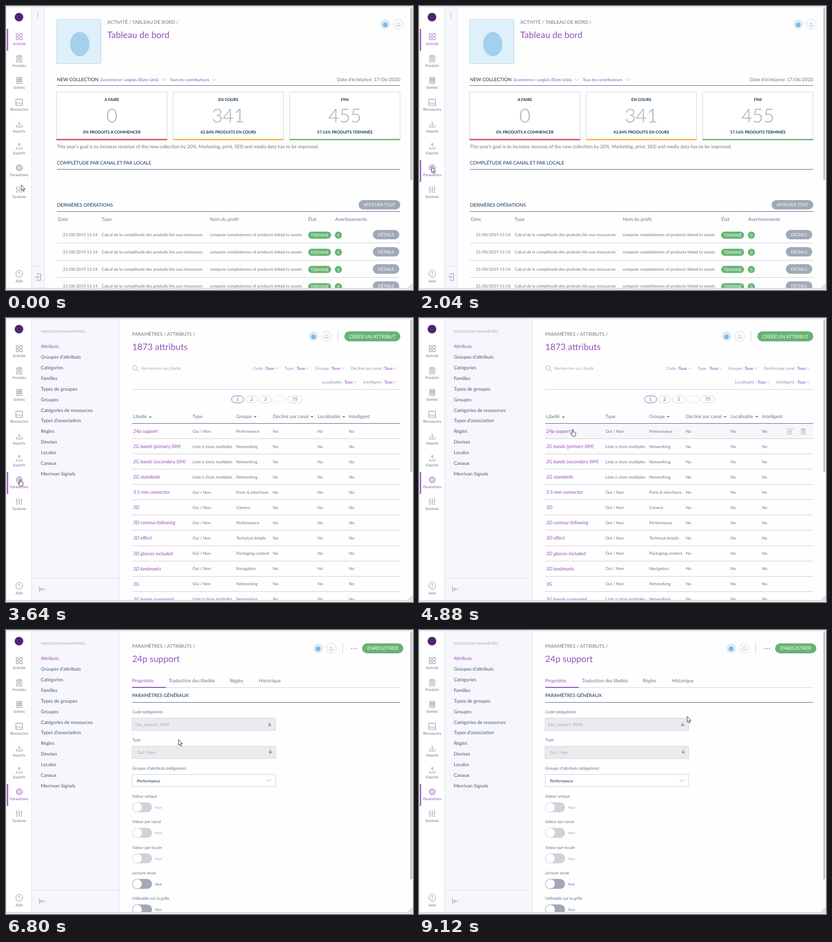
Recreate the animation shown at these times as an HTML page. Size 800 by 559 pixels, loop 9160 ms.

```html
<!DOCTYPE html>
<html lang="fr">
<head>
<meta charset="utf-8">
<title>Tableau de bord</title>
<style>
html, body { margin: 0; width: 100%; height: 100%; overflow: hidden; background: #fff; }
svg { display: block; position: absolute; left: 0; top: 0; }
text { font-family: Lato, "Open Sans", sans-serif; text-rendering: geometricPrecision; white-space: pre; }
.item { color: #67768a; }
.item .bar { visibility: hidden; }
.item.on { color: #9452ba; }
.item.on .bar { visibility: visible; }
.row .hover { visibility: hidden; }
.row.on .hover { visibility: visible; }
</style>
</head>
<body>
<svg id="stage" width="800" height="559" viewBox="0 0 800 559"></svg>
<script>
const PURPLE = '#9452ba', GREY = '#67768a', DARK = '#11324d', PALE = '#a1a9b7',
      RULE = '#ccd1d8', EDGE = '#dfe1e8', STRONG = '#566c80', GREEN = '#67b373',
      BASE = 9.35, SMALL = 8.12, MENU = 7.3;

// Markup helpers
const text = (x, y, s, size = BASE, fill = GREY, extra = '') =>
  `<text x="${x}" y="${y}" font-size="${size}" fill="${fill}" ${extra}>${s}</text>`;
const mid = (x, y, s, size, fill, extra = '') => text(x, y, s, size, fill, 'text-anchor="middle" ' + extra);
const rect = (x, y, w, h, fill, extra = '') =>
  `<rect x="${x}" y="${y}" width="${w}" height="${h}" fill="${fill}" ${extra}/>`;
const disc = (x, y, r, fill, extra = '') => `<circle cx="${x}" cy="${y}" r="${r}" fill="${fill}" ${extra}/>`;
const line = (d, stroke = GREY, w = 1, extra = '') =>
  `<path d="${d}" fill="none" stroke="${stroke}" stroke-width="${w}" ${extra}/>`;
const hr = (y, x1, x2, color = RULE, h = 1) => rect(x1, y, x2 - x1, h, color);
const pill = (x, y, w, h, fill, s, size) =>
  rect(x, y, w, h, fill, `rx="${h / 2}"`) + mid(x + w / 2, y + h / 2 + size * .36, s, size, '#fff');
const group = (s, extra = '') => `<g ${extra}>${s}</g>`;
const at = (x, y, s) => group(s, `transform="translate(${x} ${y})"`);
const chevron = (x, y, r) => line(`M${x - r} ${y - r / 2}l${r} ${r}l${r} ${-r}`, PALE, .9);

const avatar = x => disc(x, 36, 9.7, '#d9edf9') + disc(x, 37, 4.6, '#7fb5de');
const bell = x => disc(x, 36, 9.7, '#fff', `stroke="${RULE}"`) +
  line(`M${x - 4} 39h8q-1.4-1.2-1.4-4a2.6 2.6 0 0 0-5.2 0q0 2.8-1.4 4M${x - 1} 40.6h2`, PALE, .8);

const glyph = d => line(d, 'currentColor', .8);
const ring = (r, w, extra = '') => disc(0, 0, r, 'none', `stroke="currentColor" stroke-width="${w}" ${extra}`);
const icons = [
  glyph('M-6 -6h4.8v4.8h-4.8zM1.2 -6h4.8v4.8h-4.8zM-6 1.2h4.8v4.8h-4.8zM1.2 1.2h4.8v4.8h-4.8z'),
  glyph('M-2 -5h-3v11.5h10v-11.5h-3M-2 -6.5h4v3h-4zM-3 -1h6M-3 1.3h6M-3 3.6h6'),
  glyph('M-5 -6h10v12h-10zM-3 -3.5h2.2v2.2h-2.2zM.8 -3.5h2.2v2.2h-2.2zM-3 .5h2.2v2.2h-2.2zM.8 .5h2.2v2.2h-2.2z'),
  glyph('M-6.5 -6h13v12h-13zM-6.5 4l3.5 -4l3 3l3 -2.5l3.5 3.5M1.5 -3h1.6'),
  glyph('M0 -5v7M-2.5 -.3l2.5 2.5l2.5 -2.5M-5.5 2v3.5h11v-3.5'),
  glyph('M0 2v-7M-2.5 -2.5l2.5 -2.5l2.5 2.5M-5.5 2v3.5h11v-3.5'),
  ring(2.2, .8) + ring(4.9, .8) + ring(5.8, 1.3, 'stroke-dasharray="2.3 2.255"'),
  glyph('M-4.5 -6.5v5M-4.5 1v5.5M0 -6.5v8M0 4v2.5M4.5 -6.5v2.5M4.5 -1.5v8M-6.5 -.5h4M-2 2.5h4M2.5 -2.5h4')
];
const labels = ['Activité', 'Produits', 'Entités', 'Ressources', 'Imports', 'Exports', 'Paramètres', 'Système'];

const menu = rect(1, 2, 49, 553, '#fff') + rect(50, 2, 1, 553, EDGE) +
  disc(25.5, 22, 8.5, '#50246f') +
  labels.map((s, i) => group(
    rect(1.8, 45 + 43 * i, 2.4, 43, PURPLE, 'class="bar"') +
    at(26, 60.5 + 43 * i, icons[i]) +
    mid(26, 76.7 + 43 * i, s, MENU, 'currentColor'), 'class="item"')).join('') +
  disc(26, 527, 6.6, 'none', `stroke="${GREY}" stroke-width=".8"`) +
  mid(26, 530, '?', 8.5, GREY) + mid(26, 543.7, 'Aide', MENU, GREY);

const scrollbar = h => rect(794.7, 3, 3.8, h, '#c3c3c6', 'rx="1.9"');

// Dashboard
function dashboard() {
  let s = rect(51, 2, 24, 553, '#f7f6fc') + rect(75, 2, 1, 553, EDGE) + hr(512, 51, 75, EDGE);
  for (const y of [13, 17.7, 22.4]) s += disc(62.5, y, 1.1, PALE);
  s += line('M61 529v-2h7v13h-7v-2M56.5 533.5h8M62 531l2.6 2.5l-2.6 2.5', GREY, .8);
  s += rect(99.5, 26.5, 87, 87, '#def0fa', 'rx="2" stroke="#bcd5e5"');
  s += '<ellipse cx="145" cy="75" rx="19" ry="24" fill="#a5d0ec"/>';
  s += text(199, 35, 'ACTIVITÉ / TABLEAU DE BORD /') + text(199, 63, 'Tableau de bord', 17.5, PURPLE);
  s += avatar(745.5) + bell(771);
  s += text(100, 148, 'NEW COLLECTION', BASE, DARK) +
    text(186, 148, 'Ecommerce | anglais (États-Unis)', 8.05, PURPLE) + chevron(310, 145, 4.3) +
    text(322, 148, 'Tous les contributeurs', 8.05, PURPLE) + chevron(409.5, 145, 4.3) +
    text(775, 148, 'Date d’échéance: 17/06/2020', BASE, GREY, 'text-anchor="end"');
  s += hr(156, 100, 775, STRONG);
  const cards = [
    ['A FAIRE', '0', '0% PRODUITS A COMMENCER', '#d4475b'],
    ['EN COURS', '341', '42.84% PRODUITS EN COURS', '#f9b53f'],
    ['FINI', '455', '57.16% PRODUITS TERMINÉS', GREEN]
  ];
  cards.forEach(([head, n, foot, color], i) => {
    const x = 99.5 + 229 * i, c = x + 108.5;
    s += rect(x, 169.5, 217, 94, '#fff', `stroke="${RULE}" stroke-width=".9"`) +
      rect(x - .4, 261.6, 217.8, 2.6, color) +
      mid(c, 186.7, head, 7.9, DARK, 'font-weight="700"') +
      mid(c, 229.3, n, 37.5, PALE, 'font-weight="300"') +
      mid(c, 251, foot, 7.9, DARK, 'font-weight="700"');
  });
  s += text(100, 280, 'This year’s goal is to increase revenue of the new collection by 20%. Marketing, print, SEO and media data has to be improved.', BASE);
  s += text(100, 312, 'COMPLÉTUDE PAR CANAL ET PAR LOCALE', BASE, DARK) + hr(321, 100, 775, STRONG);
  s += text(100, 395, 'DERNIÈRES OPÉRATIONS', BASE, DARK) + pill(693, 382, 82, 18.5, PALE, 'AFFICHER TOUT', 8.1);
  s += hr(404, 100, 775, STRONG);
  [[102, 'Date'], [188, 'Type'], [400.5, 'Nom du profil'], [594, 'État'], [647, 'Avertissements']]
    .forEach(([x, h]) => s += text(x, 423, h));
  for (let i = 0; i < 4; i++) {
    const y = 450 + 33.8 * i;
    s += text(112, y + 3, '21/08/2019 11:14', SMALL) +
      text(188, y + 3, 'Calcul de la complétude des produits liés aux ressources', SMALL) +
      text(400.5, y + 3, 'compute completeness of products linked to assets', SMALL) +
      pill(594, y - 6, 45, 14, GREEN, 'TERMINÉ', 8.15) + pill(646.3, y - 6, 14, 14, GREEN, '0', 8.15) +
      pill(721, y - 9.3, 52, 18.6, PALE, 'DÉTAILS', 8.1) + hr(Math.round(y + 16), 100, 775);
  }
  return s + scrollbar(340);
}

// Settings navigation, shared by the list and the form
const navItems = ['Attributs', 'Groupes d’attributs', 'Catégories', 'Familles', 'Types de groupes', 'Groupes',
  'Catégories de ressources', 'Types d’association', 'Règles', 'Devises', 'Locales', 'Canaux', 'Merrivan Signals'];
const nav = rect(51, 2, 171, 553, '#f7f6fc') + rect(222, 2, 1, 553, EDGE) + hr(512, 51, 222, EDGE) +
  text(68.5, 29.3, 'NAVIGATION PARAMÈTRES', 6.85, PALE) +
  navItems.map((s, i) => text(68.5, 59.3 + 20.87 * i, s, BASE, i ? '#3f5a70' : PURPLE)).join('') +
  line('M66 528v12M77.5 534h-9.5M71.5 530.5l-3.5 3.5l3.5 3.5', GREY, .8);

const crumb = text(248, 35, 'PARAMÈTRES / ATTRIBUTS /');

// Attribute list
const many = 'Liste à choix multiples', bool = 'Oui / Non';
const rows = [
  ['24p support', bool, 'Performance'], ['2G bands (primary SIM)', many, 'Networking'],
  ['2G bands (secondary SIM)', many, 'Networking'], ['2G standards', many, 'Networking'],
  ['3.5 mm connector', bool, 'Ports &amp; interfaces'], ['3D', bool, 'Camera'],
  ['3D contour following', bool, 'Performance'], ['3D effect', bool, 'Technical details'],
  ['3D glasses included', bool, 'Packaging content'], ['3D landmarks', bool, 'Navigation'],
  ['3G', bool, 'Networking'], ['3G bands supported', many, 'Networking']
];
const rowTop = 208, rowStep = 30.08;

function list() {
  let s = nav + crumb + text(248, 63, '1873 attributs', 17.4, PURPLE) + avatar(604.5) + bell(630) +
    rect(652, 26, 1, 20, RULE) + pill(665, 26.3, 110, 19.7, GREEN, 'CRÉER UN ATTRIBUT', 9.35);
  s += disc(253.5, 98, 4.4, 'none', `stroke="${PALE}"`) + line('M256.7 101.2l4.6 4.2', PALE) +
    text(266, 102, 'Rechercher sur Libellé', 8.05, PALE);
  [[486, 102, 'Code', 510, 532], [547.5, 102, 'Type', 571.3, 592], [608, 102, 'Groupe', 640, 661.5],
   [678, 102, 'Décliné par canal', 743.5, 764.8], [621, 129, 'Localisable', 665, 686.5],
   [702.5, 129, 'Intelligent', 743.5, 764.8]].forEach(([x, y, label, vx, cx]) =>
    s += text(x, y, label + ' :', 8.05, '#8a96a6') +
      text(vx, y, 'Tous', 8.05, PURPLE, 'font-weight="600"') + chevron(cx, y - 3, 3));
  s += hr(140, 248, 775);
  [[443.5, 23.5, '1', PURPLE, GREY], [471, 23.5, '2', RULE, GREY], [498.5, 23.5, '3', RULE, GREY],
   [525.7, 24, '...', '#e3e6ea', RULE], [553.7, 28.3, '75', RULE, GREY]].forEach(([x, w, label, edge, ink]) =>
    s += rect(x, 153.3, w, 13.6, '#fff', `rx="6.8" stroke="${edge}"`) + mid(x + w / 2, 163.4, label, 9.3, ink));
  [[250, 'Libellé'], [366.5, 'Type'], [452.5, 'Groupe'], [524.5, 'Décliné par canal'], [612.5, 'Localisable'],
   [674, 'Intelligent']].forEach(([x, h]) => s += text(x, 197.3, h));
  s += `<path d="M281 196l2.7-3.2l2.7 3.2z" fill="${GREY}"/>`;
  for (const x of [490, 601.5, 664]) s += `<path d="M${x - 2.7} 193l2.7 3.2l2.7-3.2z" fill="${GREY}"/>`;
  rows.forEach(([label, type, family], i) => {
    const y = rowTop + rowStep * i, b = y + 17.5;
    const tools = line(`M732 ${y + 14}v6.5h-8v-10h5M727 ${y + 17}l.6-2.4l5.5-5.5l1.7 1.7l-5.5 5.5z`, PALE, .9) +
      line(`M752 ${y + 11}h7v9.5h-7zM750.5 ${y + 11}h10M754 ${y + 9.3}h3M754.3 ${y + 13}v5.5M756.8 ${y + 13}v5.5`, PALE, .9);
    s += group(
      group(rect(248, y, 527, 29.5, '#f7f6fb') + tools, 'class="hover"') +
      text(250, b + .4, label, 9.5, PURPLE, 'font-style="italic"') +
      text(366.5, b, type, SMALL) + text(452.5, b, family, SMALL) +
      [524.5, 612.5, 674].map(x => text(x, b, 'No', SMALL)).join('') +
      hr(Math.round(y + 29), 248, 775, '#c9cdd4'), 'class="row"');
  });
  s += hr(207, 248, 775, STRONG);
  return s + scrollbar(300);
}

// Attribute form
const lock = (x, y) => rect(x - 2.8, y - 1, 5.6, 4.4, PALE, 'rx=".6"') +
  line(`M${x - 1.7} ${y - 1}v-1a1.7 1.7 0 0 1 3.4 0v1`, PALE, 1);

function toggle(i, label) {
  const y = 349 + 50.25 * i, off = i < 3;
  return text(248, y - 19, label, SMALL) +
    rect(248, y - 9.8, 39, 19.6, off ? '#ced3da' : PALE, 'rx="9.8"') +
    disc(258, y, 9.4, '#fff', `stroke="${off ? '#ced3da' : PALE}" stroke-width=".8"`) +
    text(293, y + 3, 'Non', MENU, off ? PALE : GREY);
}

function form() {
  const must = '<tspan font-style="italic">(obligatoire)</tspan>';
  let s = nav + text(248, 63, '24p support', 17.4, PURPLE) + avatar(613.5) + bell(639.3) + rect(661, 26, 1, 20, RULE);
  for (const x of [679.3, 684, 688.7]) s += disc(x, 36.5, 1.3, PALE);
  s += pill(700, 26.3, 81, 19.7, GREEN, 'ENREGISTRER', 9.3);
  [[248, 'Propriétés'], [320, 'Traduction des libellés'], [440, 'Règles'], [497, 'Historique']]
    .forEach(([x, label], i) => s += text(x, 103.3, label, BASE, i ? GREY : PURPLE));
  s += hr(113, 248, 775) + hr(112, 248, 314, PURPLE, 2) +
    text(248, 131.5, 'PARAMÈTRES GÉNÉRAUX', 9.3, DARK) + hr(142, 248, 775, STRONG);
  const box = (y, fill) => rect(248, y, 282, 24, fill, `stroke="${RULE}"`);
  s += text(248, 164, 'Code ' + must, SMALL) + box(173.7, '#eaebee') +
    text(253, 188.5, '24p_support_9048', 8.1, PALE) + lock(518.3, 186) +
    text(248, 219.3, 'Type', SMALL) + box(229, '#eaebee') +
    text(257.5, 244.3, bool, SMALL, PALE) + lock(519.5, 239.5) +
    text(248, 274.7, 'Groupe d’attributs ' + must, SMALL) + box(284.3, '#fff') +
    text(257.5, 299.7, 'Performance', SMALL, DARK) + chevron(516.5, 296, 4.6);
  const names = ['Valeur unique', 'Valeur par canal', 'Valeur par locale', 'Lecture seule', 'Utilisable sur la grille'];
  s += names.slice(0, 3).map((n, i) => toggle(i, n)).join('');
  s += group(crumb + names.slice(3).map((n, i) => toggle(i + 3, n)).join('') + scrollbar(488), 'id="late"');
  return s;
}

const arrow = '<path d="M0 0v11.2l2.5-2.4l1.8 4.1l1.7-.8l-1.8-3.9h3.5z" fill="#fff" stroke="#222" stroke-width=".9" stroke-linejoin="round"/>';
const hand = '<path d="M-.9 0q.9-1.1 1.8 0v4.4q1-.8 1.8.2q1-.7 1.8.4q1.3-.5 1.6.8v3.5l-1.1 3.6h-5.2l-3.6-5.2q.2-1.6 1.6-.8l1.3 1.4z" fill="#fff" stroke="#222" stroke-width=".9" stroke-linejoin="round"/>';

const stage = document.getElementById('stage');
stage.innerHTML = '<defs><clipPath id="page"><rect x="1" y="2" width="798" height="553"/></clipPath></defs>' +
  rect(0, 0, 800, 559, '#e9e9ed') + rect(1, 2, 798, 553, '#fefeff') +
  group([dashboard, list, form].map(f => group(f(), 'class="scene"')).join('') + menu +
    rect(1, 2, 798, 553, '#fefeff', 'id="veil"'), 'clip-path="url(#page)"') +
  line('M.5 559V1.5H800M0 555.5H800', '#d3d3da', 1) +
  line('M791 554.5l8-8M794 554.5l5-5M797 554.5l2-2', '#8d8d92', .9) +
  disc(0, 0, 7.4, 'none', 'id="spin" stroke="#444" stroke-width=".9" stroke-dasharray="4.5 3.25"') +
  group(group(arrow, 'id="arrow"') + group(hand, 'id="hand"'), 'id="cursor"');

const find = id => document.getElementById(id);
const [veil, spin, late, cursor, arrowEl, handEl] = ['veil', 'spin', 'late', 'cursor', 'arrow', 'hand'].map(find);
const scenes = [...stage.querySelectorAll('.scene')];
const items = [...stage.querySelectorAll('.item')];
const rowEls = [...stage.querySelectorAll('.row')];
const show = (el, on) => el.style.display = on ? '' : 'none';

// Pointer stops: time, x, y
const stops = [[0, 30, 352], [960, 30, 352], [1280, 25, 317], [2200, 25, 317], [2560, 27.5, 318], [3760, 27.5, 318],
  [4520, 302, 220], [5240, 302, 220], [5320, 298, 221], [6460, 298, 221], [6800, 339, 215.5],
  [7420, 352, 250], [7720, 400, 258], [8240, 527, 170], [9160, 527, 170]];
const clamp = v => Math.max(0, Math.min(1, v));
const ramp = (t, a, b) => clamp((t - a) / (b - a));
const ease = v => v * v * (3 - 2 * v);

function pointer(t) {
  const i = Math.max(1, stops.findIndex(p => p[0] > t));
  const [t0, x0, y0] = stops[i - 1], [t1, x1, y1] = stops[i];
  const k = ease(ramp(t, t0, t1));
  return [x0 + (x1 - x0) * k, y0 + (y1 - y0) * k];
}

function draw(t) {
  const scene = t < 2200 ? 0 : t < 5760 ? 1 : 2;
  const [x, y] = pointer(t);
  const first = ramp(t, 2160, 2240) - ramp(t, 2480, 2600);
  const second = ramp(t, 5240, 5320) - ramp(t, 6280, 6420);
  const wait = Math.max(first, second);

  scenes.forEach((el, i) => show(el, i === scene));
  items.forEach((el, i) => el.classList.toggle('on',
    i === 0 ? scene === 0 : i === 6 && (scene > 0 || (t > 960 && y < 346))));
  const over = scene === 1 && x > 248 && wait === 0 ? Math.floor((y - rowTop) / rowStep) : -1;
  rowEls.forEach((el, i) => el.classList.toggle('on', i === over));

  veil.setAttribute('opacity', .84 * wait);
  late.setAttribute('opacity', ramp(t, 6280, 6420));
  show(spin, wait > .5);
  spin.setAttribute('transform', `translate(400.5 278) rotate(${t * .36 % 360})`);

  const link = scene === 1 && wait < .5 && (x < 46 || x > 248);
  show(handEl, link);
  show(arrowEl, !link);
  cursor.setAttribute('transform', `translate(${x.toFixed(1)} ${y.toFixed(1)})`);
}

function tick() {
  draw(performance.now() % 9160);
  requestAnimationFrame(tick);
}
tick();
</script>
</body>
</html>
```
